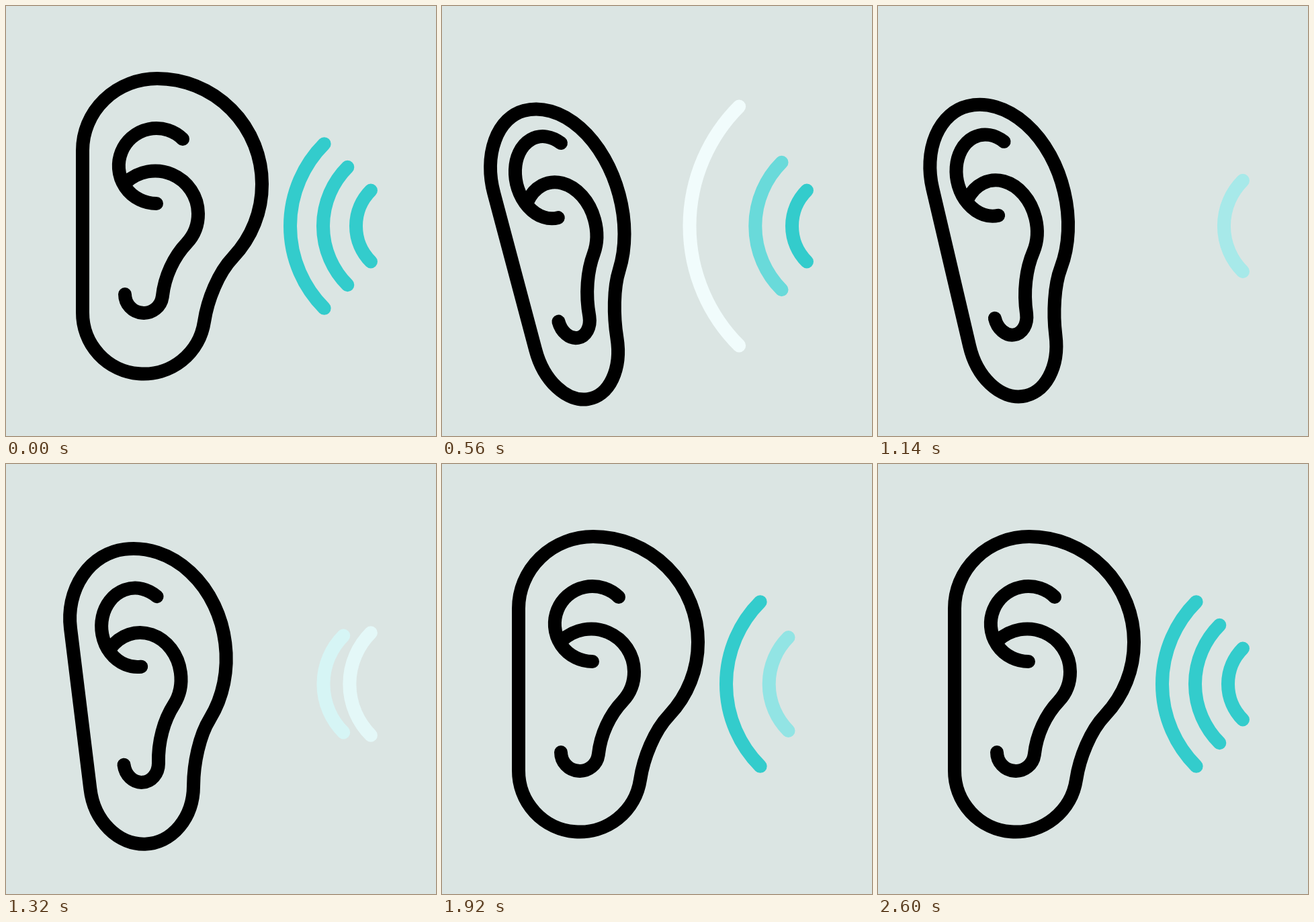
Write an HTML page with a canvas that moves like this. It is 640x640 px and loops after 2620 ms.

```html
<!DOCTYPE html>
<html lang="en">
<head>
<meta charset="utf-8">
<title>Listening ear</title>
<style>
  html, body { margin: 0; width: 100%; height: 100%; overflow: hidden; background: #dbe5e3; }
  canvas { display: block; width: 640px; height: 640px; }
</style>
</head>
<body>
<canvas id="stage" width="640" height="640"></canvas>
<script>
const LOOP = 2620;
const ctx = document.getElementById('stage').getContext('2d');

const clamp = x => Math.min(1, Math.max(0, x));
const ease = x => x * x * (3 - 2 * x);
const mix = (a, b, k) => a + (b - a) * k;

// Ear parts turn about one pivot; (x, y) and (sx, sy) are the values at full turn.
const PIVOT = { x: 205, y: 500 };
const TURN = -15;
const ear = [
  {
    path: new Path2D('M114 215A111 107 0 0 1 225 108A156 157 0 0 1 381 265A156 157 0 0 1 338 374' +
      'C316 397 300 437 295 470A91 91 0 0 1 114 456Z'),
    x: 209.6, y: 538.5, sx: 0.67, sy: 1
  },
  {
    path: new Path2D('M263 198A56 56 0 1 0 224 294' +
      'M178 263A64 64 0 0 1 286 309A64 64 0 0 1 269 353C250 373 236 402 232.7 433A28 28 0 0 1 177 429'),
    x: 216.2, y: 539.9, sx: 0.832, sy: 1.108
  }
];

// Waves share a centre for their arcs and a fixed point for scaling.
const waves = [
  { r: 173, out: 0, back: 1200 },
  { r: 124, out: 400, back: 1600 },
  { r: 75, out: 800, back: 2000 }
];
const SPAN = 600, CX = 596, CY = 327.5, ANCHOR = 543;

function drawEar(t) {
  const p = ease(clamp(t / 590)) - ease(clamp((t - 1012) / 590));
  ctx.strokeStyle = '#000';
  for (const part of ear) {
    const m = new DOMMatrix()
      .translate(mix(PIVOT.x, part.x, p), mix(PIVOT.y, part.y, p))
      .rotate(TURN * p)
      .scale(mix(1, part.sx, p), mix(1, part.sy, p))
      .translate(-PIVOT.x, -PIVOT.y);
    // Transform the outline only, so the line weight stays even.
    const shape = new Path2D();
    shape.addPath(part.path, m);
    ctx.stroke(shape);
  }
}

function drawWave({ r, out, back }, t) {
  if (t >= out + SPAN && t < back) return;
  const leaving = t < back;
  const x = clamp((t - (leaving ? out : back)) / SPAN);
  const scale = leaving ? mix(1, 1.46, ease(x)) : mix(0.54, 1, ease(x));
  const white = leaving ? x : 1 - x;
  const gb = Math.round(mix(204, 255, white));
  ctx.strokeStyle = `rgb(${Math.round(mix(51, 255, white))},${gb},${gb})`;
  ctx.beginPath();
  ctx.arc(ANCHOR + (CX - ANCHOR) * scale, CY, r * scale, Math.PI * 0.75, Math.PI * 1.25);
  ctx.stroke();
}

function draw(now) {
  const t = now % LOOP;
  ctx.fillStyle = '#dbe5e3';
  ctx.fillRect(0, 0, 640, 640);
  ctx.lineWidth = 20;
  ctx.lineCap = ctx.lineJoin = 'round';
  drawEar(t);
  for (const wave of waves) drawWave(wave, t);
}

let start;
function tick(now) {
  start ??= now;
  draw(now - start);
  requestAnimationFrame(tick);
}
draw(0);
requestAnimationFrame(tick);
</script>
</body>
</html>
```
